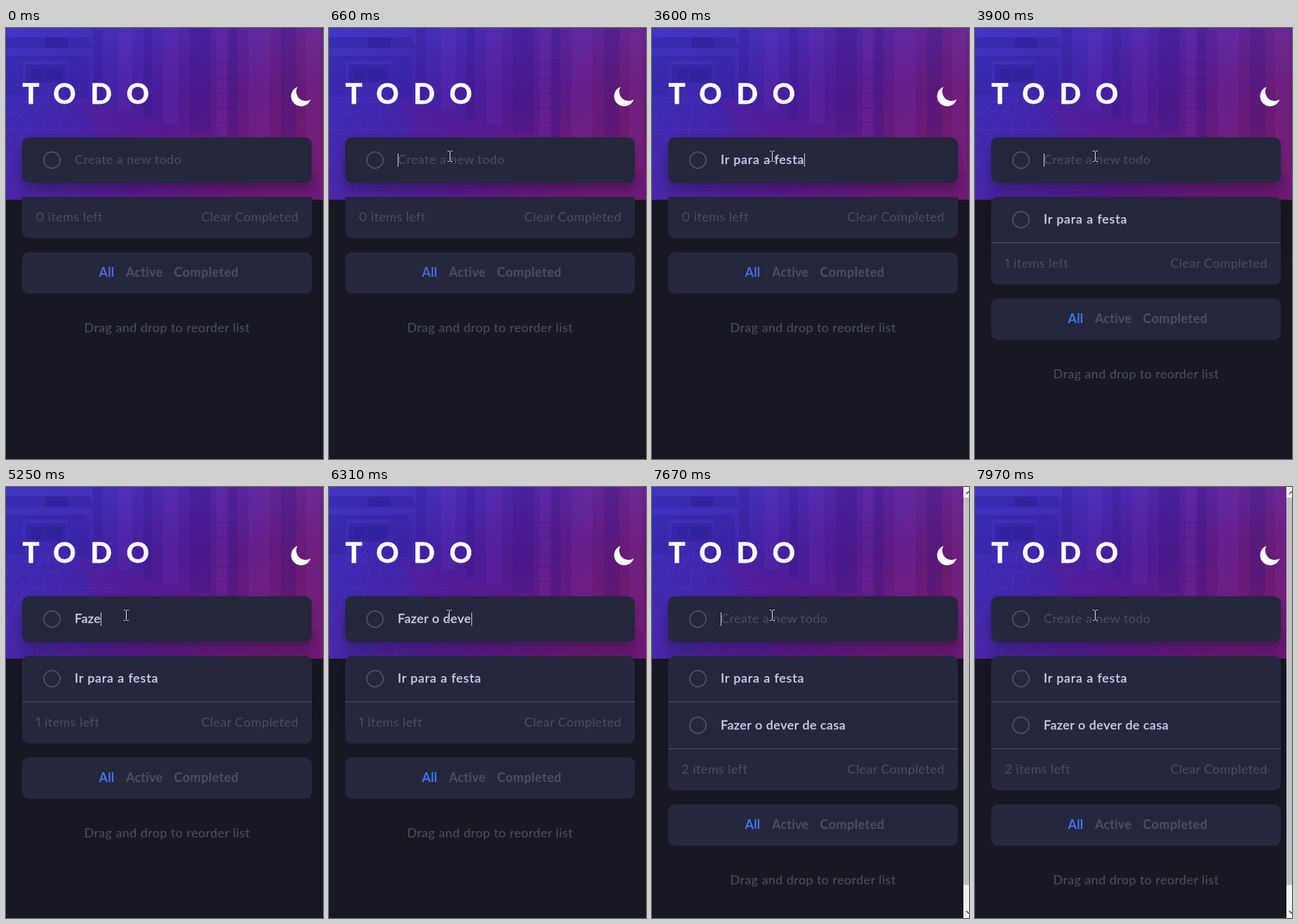
These frames come from a looping animation (452x615 px, 8000 ms). An HTML page:

```html
<!DOCTYPE html>
<html lang="en">
<head>
<meta charset="utf-8">
<title>Todo</title>
<style>
  html, body { margin: 0; width: 100%; height: 100%; overflow: hidden; background: #171823; }
  svg { display: block; width: 452px; height: 615px; }
  text { font: 400 18px Lato, "Open Sans", sans-serif; font-variant-numeric: proportional-nums; letter-spacing: .42px; fill: #4b4d64; white-space: pre; }
  .title { font-size: 40px; font-weight: 700; letter-spacing: 20.8px; fill: #fff; stroke: #fff; stroke-width: .8px; }
  .tab { font-weight: 700; letter-spacing: .2px; }
  .task { font-weight: 500; fill: #c8cbe7; stroke: #c8cbe7; stroke-width: .3px; }
  .card { fill: #25273c; }
  .shade { fill: #0b0b16; opacity: .34; filter: blur(9px); }
  .ring { fill: none; stroke: #4d5067; stroke-width: 1.8; }
</style>
</head>
<body>
<svg viewBox="0 0 452 615">
  <defs>
    <linearGradient id="hue" x2="1" y2=".25">
      <stop offset="0" stop-color="#3c33c2"/>
      <stop offset=".3" stop-color="#4228b0"/>
      <stop offset=".6" stop-color="#541b96"/>
      <stop offset=".82" stop-color="#691b80"/>
      <stop offset="1" stop-color="#761b6e"/>
    </linearGradient>
    <linearGradient id="depth" x2="0" y2="1">
      <stop offset="0" stop-color="#4a44d0" stop-opacity=".26"/>
      <stop offset=".4" stop-color="#31188c" stop-opacity=".18"/>
      <stop offset="1" stop-color="#7c1874" stop-opacity=".16"/>
    </linearGradient>
    <clipPath id="banner"><path d="M0 0H452V245H0Z"/></clipPath>
  </defs>

  <g clip-path="url(#banner)">
    <path fill="url(#hue)" d="M0 0H452V245H0Z"/>
    <path fill="url(#depth)" d="M0 0H452V245H0Z"/>
    <g fill="#281d8c">
      <path opacity=".3" d="M0 13H118L124 29H0ZM0 40H116L112 46H0Z"/>
      <path opacity=".45" d="M56 14H88V28H56Z"/>
      <path opacity=".4" d="M28 52H86V78H28Z"/>
      <path opacity=".3" d="M36 58H50V74H36ZM56 58H80V74H56Z"/>
      <path opacity=".22" d="M0 46H24V96H0ZM88 46H118V100H88Z"/>
    </g>
    <path fill="#641a90" opacity=".3" d="M96 100L452 215V245H190Z"/>
    <g id="columns"></g>
    <g id="floor" stroke="#6a62ee" fill="none"></g>
    <g class="shade"><rect x="23" y="170" width="413" height="62"/><rect id="listShade" x="23" y="251"/></g>
  </g>
  <rect id="lowShade" class="shade" x="21" width="417" y="250"/>

  <text class="title" x="23.5" y="108">TODO</text>
  <path fill="#fff" d="M415.500 84A14.400 14.400 0 1 0 434.500 102A13.500 13.500 0 0 1 415.500 84Z"/>

  <rect class="card" x="23" y="156" width="413" height="65" rx="9.500"/>
  <circle class="ring" cx="65.500" cy="188.500" r="11.600"/>
  <text id="hint" x="98" y="194">Create a new todo</text>
  <text id="input" class="task" x="98" y="194"></text>
  <rect id="caret" y="179" width="1" height="19" fill="#c8cbe7"/>

  <path id="list" class="card"/>
  <g id="rows"></g>
  <g id="foot">
    <text id="count" x="42.500" y="276"></text>
    <text x="278.500" y="276">Clear Completed</text>
    <rect class="card" x="23" y="320" width="413" height="59" rx="9.500"/>
    <text id="all" class="tab" x="132.500" y="355">All</text>
    <text class="tab" x="171" y="355">Active</text>
    <text class="tab" x="239.500" y="355" style="letter-spacing:.5px">Completed</text>
    <text x="111.500" y="434">Drag and drop to reorder list</text>
  </g>

  <g id="arrow"><path d="M.5 .5V16.500L4.300 13L6.800 18.500L9 17.500L6.600 12.200H11.500Z" fill="#fff" stroke="#111"/></g>
  <g id="beam" fill="none">
    <path d="M-3 -8H-1L.5 -7L2 -8H4M.5 -7V7M-3 8H-1L.5 7L2 8H4" stroke="#14141f" stroke-width="2.400" opacity=".5"/>
    <path d="M-3 -7.500H-.5M1.500 -7.500H4M.5 -7V7M-3 7.500H-.5M1.500 7.500H4" stroke="#e4e4e4"/>
  </g>

  <g id="scrollbar">
    <path fill="#f1f1f1" d="M444 0H452V615H444Z"/>
    <path fill="#c1c1c1" d="M444 15H452V568H444Z"/>
    <path fill="none" stroke="#505050" stroke-width="1.600" d="M448 10L452 6M448 605L452 609"/>
  </g>
</svg>
<script>
  const LOOP = 8000;
  const $ = id => document.getElementById(id);
  const show = (el, on) => { el.style.display = on ? '' : 'none'; };
  const set = (el, attrs) => { for (const k in attrs) el.setAttribute(k, attrs[k]); };
  const make = (parent, tag, attrs) => {
    const el = document.createElementNS('http://www.w3.org/2000/svg', tag);
    set(el, attrs);
    return parent.appendChild(el);
  };

  // Evenly spaced key presses: [time, letters typed]
  const run = (from, to, n, first) =>
    Array.from({ length: n }, (_, i) => [Math.floor(from + (to - from) * i / (n - 1)), first + i]);

  const tasks = [
    { text: 'Ir para a festa', gap: .8, added: 3900, y: 273.5, keys: [
      [1440, 1], ...run(1740, 2380, 7, 2), [2590, 9], [2740, 10], ...run(3100, 3600, 5, 11)] },
    { text: 'Fazer o dever de casa', gap: .47, added: 7670, y: 340, keys: [
      [4540, 1], ...run(4890, 5250, 3, 2), ...run(5380, 5810, 5, 5),
      ...run(5960, 6960, 9, 10), ...run(7110, 7460, 3, 19)] }
  ];
  const caretOn = [[660, 1160], [1440, 4120], [4540, 7970]];
  const pointer = [
    [70, 315, 387], [170, 292, 350], [270, 250, 286], [360, 208, 228],
    [460, 180, 192], [560, 172, 178], [660, 172, 183], [1740, 171, 183]
  ];
  const last = (steps, t) => steps.filter(s => s[0] <= t).pop();

  // Wall pillars with brick joints, then floor seams
  [[124, 14], [160, 20], [196, 12], [224, 22], [262, 30], [300, 14], [318, 12], [346, 30], [392, 22], [428, 20]]
    .forEach(([x, w], i) => make($('columns'), 'path', {
      d: `M${x} 0h${w}v${105 + (x - 120) * .32}h${-w}Z`,
      fill: i % 2 ? '#8a3fc4' : '#2c1280', opacity: i % 2 ? .13 : .22
    }));
  for (let y = 50; y < 190; y += 21)
    make($('columns'), 'path', { d: `M296 ${y}h36v2h-36Z`, fill: '#2c1280', opacity: .22 });
  for (let i = 0; i < 8; i++)
    make($('floor'), 'path', { d: `M${40 + i * 7} 96L${-150 + i * 62} 245`, opacity: .24 - i * .02 });
  for (let i = 0; i < 6; i++) {
    const y = 100 + i * i * 5;
    make($('floor'), 'path', { d: `M0 ${y}H${110 + i * 20}`, opacity: .14 });
  }

  for (const task of tasks) {
    task.row = make($('rows'), 'g', {});
    make(task.row, 'circle', { class: 'ring', cx: 65.5, cy: task.y, r: 11.6 });
    make(task.row, 'text', { class: 'task', x: 98, y: task.y + 5.5, style: `letter-spacing:${task.gap}px` })
      .textContent = task.text;
    make(task.row, 'rect', { x: 23, y: Math.floor(task.y + 33), width: 413, height: 1, fill: '#4d5067' });
  }

  function drawInput(t) {
    const task = tasks.find(k => t < k.added);
    const key = task && last(task.keys, t);
    const typed = key ? task.text.slice(0, key[1]) : '';
    const input = $('input');
    input.textContent = typed;
    input.style.letterSpacing = (task ? task.gap : 0) + 'px';
    show($('hint'), !typed);
    set($('caret'), { x: typed ? Math.round(98 + input.getComputedTextLength()) : 98 });
    show($('caret'), caretOn.some(([a, b]) => t >= a && t < b));
  }

  function drawList(t) {
    const n = tasks.filter(k => t >= k.added).length;
    const shift = [0, 66, 133][n];
    const end = 300 + shift;
    tasks.forEach((k, i) => show(k.row, i < n));
    const corner = 'a9.5 9.5 0 0 1 ';
    set($('list'), { d: (n ? `M23 250.5${corner}9.5 -9.5H426.5${corner}9.5 9.5` : 'M23 241H436')
      + `V${end - 9.5}${corner}-9.5 9.5H32.5${corner}-9.5 -9.5Z` });
    set($('listShade'), { width: 413, height: n ? 50 : 0 });
    set($('lowShade'), { height: n ? n * 66 + 15 : 0 });
    set($('foot'), { transform: `translate(0 ${shift})` });
    $('count').textContent = n + ' items left';
    $('all').style.fill = n ? '#3c76f2' : '#4a68e0';
    show($('scrollbar'), n === 2);
  }

  function drawPointer(t) {
    const at = last(pointer, t);
    const typing = at && at[2] < 221;
    show($('arrow'), at && !typing);
    show($('beam'), typing);
    if (at) set($(typing ? 'beam' : 'arrow'), { transform: `translate(${at[1]} ${at[2]})` });
  }

  function draw(now) {
    const t = now % LOOP;
    drawInput(t);
    drawList(t);
    drawPointer(t);
    requestAnimationFrame(draw);
  }
  draw(performance.now());
</script>
</body>
</html>
```
